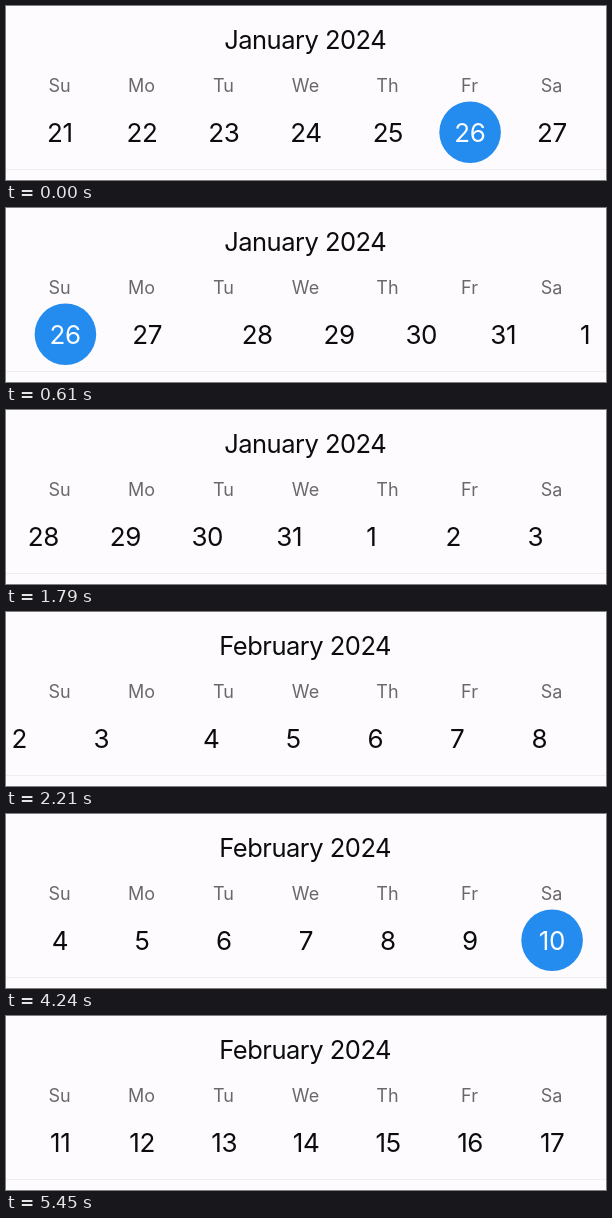
An HTML page that plays this animation: 600x174 px, repeating every 5640 ms.

```html
<!DOCTYPE html>
<html lang="en">
<head>
<meta charset="utf-8">
<title>Week strip calendar</title>
<style>
  html, body { margin: 0; width: 100%; height: 100%; overflow: hidden; background: #fdfbfe; }
  svg { display: block; width: 600px; height: 174px; }
  text { font-family: Inter, "Liberation Sans", sans-serif; text-anchor: middle; }
  .title { font-size: 25.5px; letter-spacing: -.5px; fill: #0c0c0e; }
  .weekday { font-size: 18px; fill: #69686c; }
  .day { font-size: 26px; letter-spacing: -.4px; }
</style>
</head>
<body>
<svg id="stage" viewBox="0 0 600 174">
  <text id="title" class="title" x="299.2" y="43"></text>
  <g id="weekdays"></g>
  <g id="strip"></g>
  <rect y="163" width="600" height="1" fill="#eeecf0"/>
</svg>
<script>
const LOOP = 5640, PAGE = 602, FIRST_X = 53.5, STEP = 82;
const INK = [12, 12, 14], WHITE = [250, 252, 255];
const BLUE = [36, 139, 239], DULL_BLUE = [105, 156, 198];

const clamp = v => Math.max(0, Math.min(1, v));
const mix = (a, b, k) => `rgb(${a.map((v, i) => Math.round(v + (b[i] - v) * k))})`;
const byId = id => document.getElementById(id);

function add(parent, tag, attrs, label) {
  const el = document.createElementNS("http://www.w3.org/2000/svg", tag);
  for (const key in attrs) el.setAttribute(key, attrs[key]);
  if (label !== undefined) el.textContent = label;
  parent.appendChild(el);
  return el;
}

// One page swipe: the finger moves a little before the strip starts to follow,
// then the strip speeds up and glides to rest. Slower swipes have a larger span.
function swipe(t, start, span) {
  const touch = start - 85;
  return t < start ? 0 : PAGE * (1 - Math.exp(-(((t - touch) / span) ** 2.2)));
}

["Su", "Mo", "Tu", "We", "Th", "Fr", "Sa"].forEach((name, i) =>
  add(byId("weekdays"), "text", { class: "weekday", x: FIRST_X + i * STEP, y: 85.5 }, name));

// Four weeks starting on January 21
const days = Array.from({ length: 28 }, (_, i) => {
  const x = FIRST_X + .4 + (i % 7) * STEP + Math.floor(i / 7) * PAGE;
  return {
    disc: add(byId("strip"), "circle", { cx: x + .2, cy: 126.3, r: 30.8, opacity: 0 }),
    label: add(byId("strip"), "text", { class: "day", x, y: 136, fill: mix(INK, INK, 0) }, (20 + i) % 31 + 1)
  };
});

function mark(i, k, opacity) {
  const { disc, label } = days[i];
  disc.setAttribute("fill", mix(DULL_BLUE, BLUE, k));
  disc.setAttribute("opacity", opacity);
  label.setAttribute("fill", mix(INK, WHITE, k * opacity));
}

// A tapped day appears half tinted, then settles
function tap(i, t, start, fade = 0) {
  const shown = t >= start ? 1 - fade : 0;
  mark(i, clamp(.45 + .55 * (t - start) / 60), shown);
}

function draw(t) {
  const shift = swipe(t, 180, 491) + swipe(t, 1790, 437) + swipe(t, 4850, 269.3);
  byId("strip").setAttribute("transform", `translate(${-shift} 0)`);
  byId("title").textContent = (shift > PAGE * 1.5 ? "February" : "January") + " 2024";
  mark(5, 1, 1);
  tap(19, t, 3240, clamp((t - 4100) / 120));
  tap(20, t, 4120);
}

const start = performance.now();
function frame() {
  draw((performance.now() - start) % LOOP);
  requestAnimationFrame(frame);
}
frame();
</script>
</body>
</html>
```
